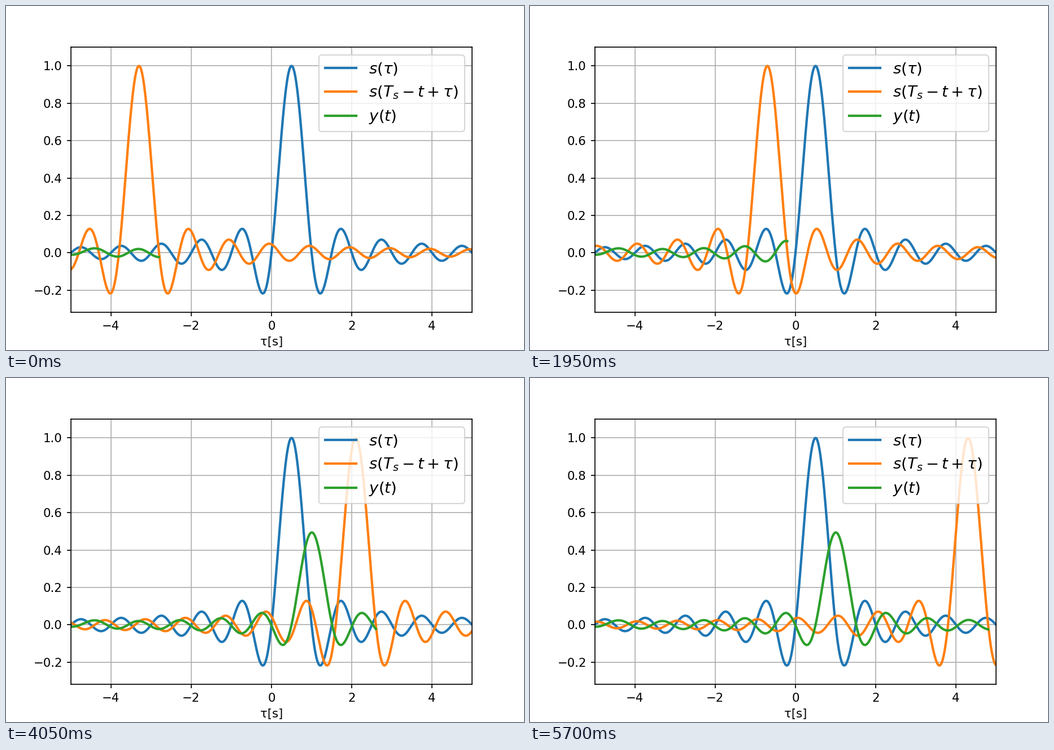
A matplotlib script for the animation above (5850 ms loop, 917 by 611 pixels).

```python
import numpy as np
import matplotlib.pyplot as plt
from matplotlib.animation import FuncAnimation

DPI = 152.8
WIDTH, HEIGHT = 917, 611
FRAMES, INTERVAL = 39, 150
T_S = 1.0              # signal duration
T_START, T_STEP = -2.8, 0.2


def s(t):
    """Sinc pulse centred in [0, T_S]."""
    return np.sinc(2 * (t - T_S / 2))


tau = np.linspace(-5, 5, 1000)
signal = s(tau)
# Matched filter output; s(T_S - t) equals s(t) by symmetry.
output = np.convolve(signal, s(T_S - tau), mode="same") * (tau[1] - tau[0])

plt.rcParams["font.family"] = "DejaVu Sans"
fig, ax = plt.subplots(
    figsize=((WIDTH + 0.001) / DPI, (HEIGHT + 0.001) / DPI), dpi=DPI)

ax.plot(tau, signal, lw=2, label=r"$s(\tau)$")
shifted, = ax.plot([], [], lw=2, label=r"$s(T_s-t+\tau)$")
filtered, = ax.plot([], [], lw=2, label=r"$y(t)$")

ax.set_xlim(-5, 5)
ax.set_ylim(signal.min() - 0.1, signal.max() + 0.1)
ax.set_xlabel("τ[s]")
ax.grid(True)
ax.legend(loc="upper right", fontsize=13)


def update(i):
    t = T_START + T_STEP * i
    shifted.set_data(tau, s(T_S - t + tau))
    done = tau <= t + 1e-9
    filtered.set_data(tau[done], output[done])
    return shifted, filtered


anim = FuncAnimation(fig, update, frames=FRAMES, interval=INTERVAL,
                     init_func=lambda: update(0), repeat=True, repeat_delay=0)

plt.show()
```
